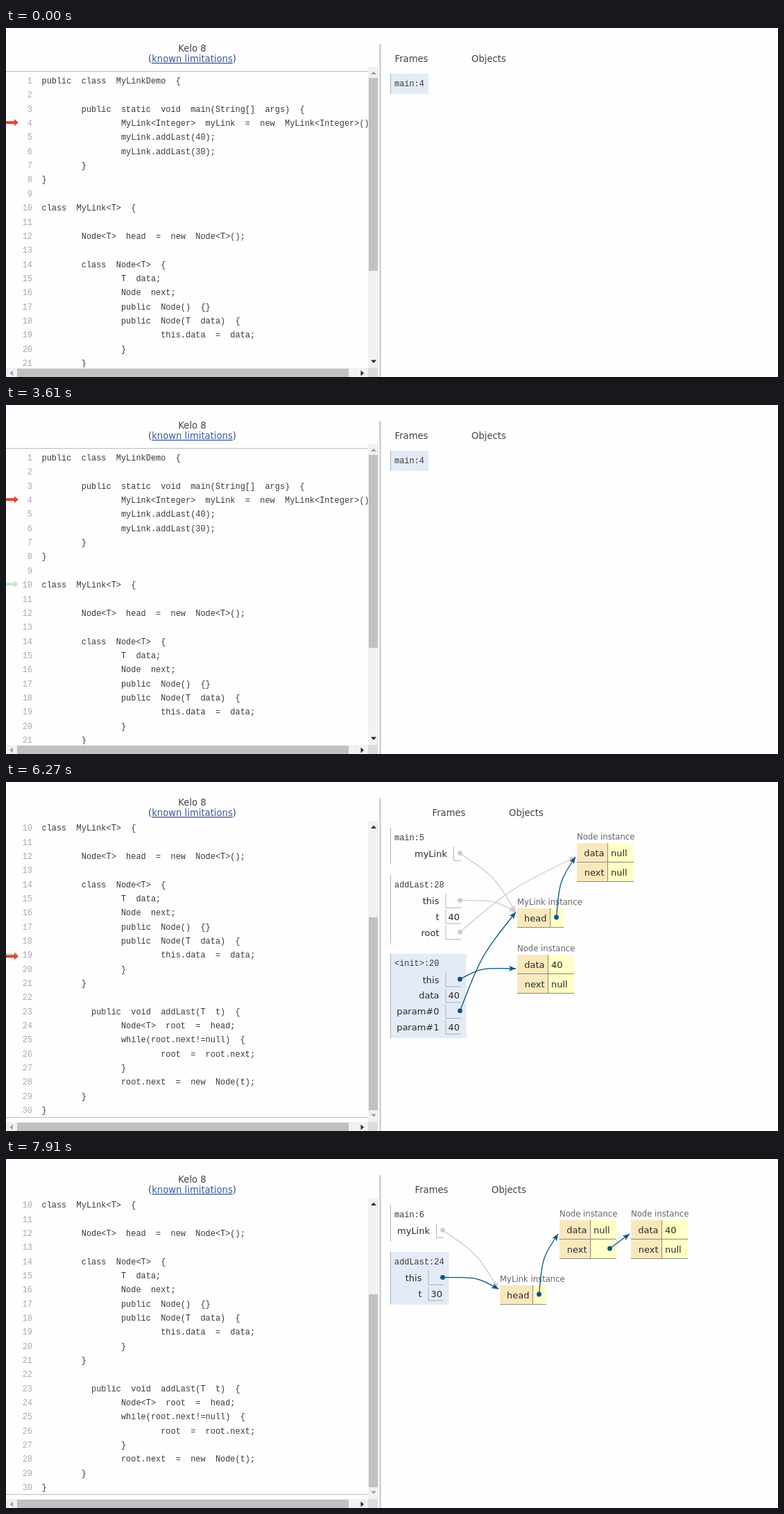
Write an HTML page that moves like this. It is 1113 px wide and 503 px high and loops after 7990 ms.

```html
<!DOCTYPE html>
<html lang="en">
<head>
<meta charset="utf-8">
<title>Linked list, step by step</title>
<style>
  html, body { margin: 0; width: 100%; height: 100%; overflow: hidden; background: #fefefe; }
  svg { display: block; }
  text { font: 13px "DejaVu Sans", sans-serif; fill: #2a2a2a; white-space: pre; }
  .mono { font-family: "Liberation Mono", monospace; fill: #3a3a3a; }
  .num { fill: #aaa; }
  .head { font-size: 13.2px; fill: #444; }
  .link { fill: #3d58a2; text-decoration: underline; }
  .type { font-size: 11.65px; fill: #666; }
  .ret { font-size: 12px; fill: #e93f34; }
</style>
</head>
<body>
<script>
const LOOP = 7990, MAX_SCROLL = 193, LINE = 20.35;
const BLUE = '#005583', GREY = '#ccc';

const SOURCE = `public class MyLinkDemo {

\tpublic static void main(String[] args) {
\t\tMyLink<Integer> myLink = new MyLink<Integer>();
\t\tmyLink.addLast(40);
\t\tmyLink.addLast(30);
\t}
}

class MyLink<T> {

\tNode<T> head = new Node<T>();

\tclass Node<T> {
\t\tT data;
\t\tNode next;
\t\tpublic Node() {}
\t\tpublic Node(T data) {
\t\t\tthis.data = data;
\t\t}
\t}

\t public void addLast(T t) {
\t\tNode<T> root = head;
\t\twhile(root.next!=null) {
\t\t\troot = root.next;
\t\t}
\t\troot.next = new Node(t);
\t}
}`;

// Heap layouts: id, type, x from column, label y, fields ("name=value" or "name>id")
const first = 'N Node 86 79 data=null next=null';
const link = 'M MyLink 0 173 head>N';
const HEAPS = {
  none: [],
  empty: ['M MyLink 0 79 head=null'],
  making: ['M MyLink 0 79 head=null', 'N Node 0 146 data=null next=null'],
  one: [first, link],
  fresh: [first, link, 'K Node 0 240 data=null next=null'],
  filled: [first, link, 'K Node 0 240 data=40 next=null'],
  two: ['N Node 86 79 data=null next>K', link, 'K Node 189 79 data=40 next=null']
};

const main5 = 'main:5 myLink>M', main6 = 'main:6 myLink>M';
const add = ' this>M t=40', root = add + ' root>N';
const make = ' this>K data=40 param#0>M param#1=40';
// Panels: start, right edge of the stack, heap, stack frames
const PANELS = [
  [0, 609, 'none', 'main:4'],
  [1090, 630, 'empty', 'main:4', '<init>:10 this>M'],
  [1780, 630, 'empty', 'main:4', '<init>:12 this>M'],
  [2250, 651, 'making', 'main:4', '<init>:12 this>M', '<init>:17 this>N param#0>M'],
  [2490, 674, 'making', 'main:4', '<init>:12 this>M', '<init>:17 this>N param#0>M Return=void'],
  [2730, 630, 'empty', 'main:4', '<init>:12 this>M'],
  [3130, 653, 'one', 'main:4', '<init>:10 this>M Return=void'],
  [3370, 609, 'none', 'main:4'],
  [3690, 638, 'one', main5],
  [4130, 638, 'one', main5, 'addLast:24' + add],
  [4770, 638, 'one', main5, 'addLast:25' + root],
  [5090, 638, 'one', main5, 'addLast:28' + root],
  [5250, 663, 'fresh', main5, 'addLast:28' + root, '<init>:18' + make],
  [5950, 663, 'fresh', main5, 'addLast:28' + root, '<init>:19' + make],
  [6180, 663, 'filled', main5, 'addLast:28' + root, '<init>:20' + make],
  [6410, 674, 'filled', main5, 'addLast:28' + root, '<init>:20' + make + ' Return=void'],
  [6650, 638, 'one', main5, 'addLast:28' + root],
  [7060, 653, 'two', main5, 'addLast:29' + root + ' Return=void'],
  [7240, 638, 'two', main5],
  [7450, 638, 'two', main6],
  [7670, 638, 'two', main6, 'addLast:24 this>M t=30']
];

// Gutter arrow: click, slide start, duration, line
const SLIDES = [
  [1090, 1365, 250, 10], [1780, 1970, 250, 12], [2340, 2340, 230, 17],
  [2600, 2600, 60, 17], [2840, 2840, 250, 12], [3120, 3120, 220, 10],
  [3390, 3390, 230, 4], [3650, 3650, 230, 5], [4450, 4450, 170, 24],
  [4770, 4970, 240, 25], [5210, 5210, 250, 28], [5530, 5530, 250, 18],
  [5930, 5930, 220, 19], [6200, 6200, 220, 20], [6520, 6520, 60, 20],
  [6780, 6780, 250, 28], [7070, 7070, 150, 29], [7340, 7340, 140, 5],
  [7490, 7490, 100, 6]
];
// Scroll: start, duration, from, to
const SCROLLS = [
  [4128, 300, 0, MAX_SCROLL], [7200, 180, MAX_SCROLL, 0], [7610, 290, 0, MAX_SCROLL]
];

function el(parent, tag, attrs, content) {
  const e = document.createElementNS('http://www.w3.org/2000/svg', tag);
  for (const k in attrs) e.setAttribute(k, attrs[k]);
  if (content !== undefined) e.textContent = content;
  parent.append(e);
  return e;
}
const group = p => el(p, 'g', {});
const rect = (p, x, y, width, height, fill) => el(p, 'rect', { x, y, width, height, fill });
const path = (p, d, stroke, w = 1) => el(p, 'path', { d, stroke, 'stroke-width': w, fill: 'none' });
const poly = (p, points, fill) => el(p, 'polygon', { points, fill });
const text = (p, x, y, s, cls = '', anchor = 'start') =>
  el(p, 'text', { x, y, class: cls, 'text-anchor': anchor }, s);

// Choose the size that gives the code its character pitch
const pen = document.createElement('canvas').getContext('2d');
pen.font = '100px "Liberation Mono", monospace';
const codeSize = 716 / pen.measureText('0').width;
const mono = (p, x, y, s, cls = '', anchor) => {
  text(p, x, y, s, 'mono ' + cls, anchor).style.fontSize = codeSize + 'px';
};

const stage = el(document.body, 'svg', { width: 1113, height: 503, viewBox: '0 0 1113 503' });

// Header
text(stage, 268.5, 34, 'Kelo 8', 'head', 'middle');
const title = text(stage, 268.5, 49, '(', 'head', 'middle');
el(title, 'tspan', { class: 'link' }, 'known limitations');
el(title, 'tspan', {}, ')');

// Code
const view = el(stage, 'svg', { x: 0, y: 56, width: 522, height: 433, viewBox: '0 56 522 433' });
const code = group(view);
path(code, 'M0 62.5H522M0 676.5H522', '#bbb');
SOURCE.split('\n').forEach((s, i) => {
  const y = 80 + i * LINE;
  mono(code, 38, y, i + 1, 'num', 'end');
  mono(code, 51.5, y, s.replace(/ /g, '  ').replace(/\t/g, ' '.repeat(8)));
});
const ARROW = '0,-2 12,-2 12,-5 18,0 12,5 12,2 0,2';
const prevArrow = poly(code, ARROW, '#c9e6ca');
const curArrow = poly(code, ARROW, '#e0452e');

// Scrollbars and divider
rect(stage, 522, 56, 15, 434, '#f1f1f1');
rect(stage, 0, 490, 522, 13, '#f1f1f1');
rect(stage, 522, 490, 14, 13, '#dcdcdc');
const thumb = rect(stage, 523, 72, 13, 278, '#c1c1c1');
rect(stage, 16, 491, 478, 12, '#c1c1c1');
const up = poly(stage, '526,67 534,67 530,62.5');
const down = poly(stage, '526,478.5 534,478.5 530,483');
poly(stage, '10,493.5 10,501.5 5.5,497.5', '#a3a3a3');
poly(stage, '511.5,493.5 511.5,501.5 516,497.5', '#5a1530');
rect(stage, 538, 23, 3, 480, '#d6d6d6');

function connect(p, [x0, y0], [x1, y1], color) {
  const dx = x1 - x0, dy = y1 - y0;
  const bend = Math.hypot(dx, dy) < 60 ? 0 : 9;
  const cx = x0 + dx / 2 + (dy > 0 ? bend : -bend), cy = y0 + dy / 2 - bend;
  path(p, `M${x0} ${y0}C${cx} ${cy} ${cx} ${cy} ${x1} ${y1}`, color, 1.3);
  el(p, 'circle', { cx: x0, cy: y0, r: 3.4, fill: color });
  const turn = Math.atan2(y1 - cy, x1 - cx) * 180 / Math.PI;
  poly(p, '0,0 -10,-4 -7.5,0 -10,4', color)
    .setAttribute('transform', `translate(${x1} ${y1}) rotate(${turn})`);
}

function drawObject(p, x, spec, tips, wires) {
  const [id, type, dx, labelY, ...fields] = spec.split(' ');
  const left = x + +dx, top = +labelY + 9;
  const isNode = type === 'Node';
  const keyW = isNode ? 44.5 : 47.5;
  const valW = isNode || fields[0].includes('=') ? 37.5 : 19.5;
  text(p, left, +labelY + 4, type + ' instance', 'type');
  fields.forEach((f, i) => {
    const y = top + i * 28, mid = left + keyW;
    const [name, value] = f.split(/[=>]/);
    rect(p, left, y, keyW, 27, '#fae8bd');
    rect(p, mid, y, valW, 27, '#ffffc6');
    path(p, `M${left} ${y + 27.5}h${keyW + valW}M${mid} ${y}v27`, '#8a8a80');
    text(p, mid - 5, y + 18.5, name, '', 'end');
    if (f.includes('=')) text(p, mid + 4.5, y + 18.5, value);
    else wires.push([[mid + (isNode ? 28 : 9), y + 13], value, BLUE]);
  });
  tips[id] = [left - 2, top + (isNode ? 20 : 5.5)];
}

function drawFrame(p, top, right, spec, active, wires) {
  const [label, ...vars] = spec.split(' ');
  const cellW = spec.includes('void') ? 33 : spec.includes('=') ? 22 : 10.5;
  const cell = right - 7 - cellW;
  const rets = spec.includes('Return') ? 1 : 0, n = vars.length - rets;
  const h = (vars.length ? 30.2 : 29) + n * 22.8 + rets * 35;
  if (active) rect(p, 554, top, right - 553.5, h, '#e2ebf6');
  path(p, `M554.5 ${top}v${h}`, '#a6b3b6');
  mono(p, 560, top + 17.5, label);
  vars.forEach((v, i) => {
    const [name, value] = v.split(/[=>]/), isRet = name === 'Return';
    const y = top + 37.3 + i * 22.8 + (isRet ? 6 : 0), half = isRet ? 16 : 10;
    path(p, `M${cell} ${y - half}v${2 * half}h${cellW}`, '#a6b3b6');
    if (isRet) {
      text(p, cell - 9.5, y - 3, name, 'ret', 'end');
      text(p, cell - 9.5, y + 11, 'value', 'ret', 'end');
    } else text(p, cell - 9.5, y + 4.7, name, '', 'end');
    if (v.includes('=')) text(p, cell + 3.5, y + 4.7, value);
    else wires.push([[right - 8.5, y - 0.7], value, active ? BLUE : GREY]);
  });
  return top + h + 15;
}

const panels = PANELS.map(([start, right, heap, ...frames]) => {
  const g = group(stage), tips = {}, wires = [];
  text(g, right - 48.5, 48.5, 'Frames', 'head');
  text(g, right + 62, 48.5, 'Objects', 'head');
  HEAPS[heap].forEach(o => drawObject(g, right + 74, o, tips, wires));
  let top = 66;
  frames.forEach((f, i) => { top = drawFrame(g, top, right, f, i === frames.length - 1, wires); });
  wires.sort((a, b) => (a[2] === BLUE) - (b[2] === BLUE));
  wires.forEach(([from, id, color]) => connect(g, from, tips[id], color));
  return { start, g };
});

const clamp = v => Math.max(0, Math.min(1, v));
const cubic = p => p < 0.5 ? 4 * p ** 3 : 1 - 4 * (1 - p) ** 3;
const swing = p => 0.5 - Math.cos(Math.PI * p) / 2;
const lineY = n => 75.2 + (n - 1) * LINE;

function scrollAt(t) {
  let y = 0;
  for (const [start, dur, from, to] of SCROLLS)
    if (t >= start) y = from + (to - from) * swing(clamp((t - start) / dur));
  return y;
}

function arrowsAt(t) {
  let line = 4, y = lineY(4), prev = null;
  for (const [click, start, dur, to] of SLIDES) {
    if (t < click) break;
    const same = to === line, goal = lineY(to) + (same ? 2.8 : 0);
    prev = lineY(line) - (same ? 1.5 : 0);
    y += (goal - y) * cubic(clamp((t - start) / dur));
    line = to;
  }
  return { y, prev };
}

function draw(t) {
  const scroll = scrollAt(t), { y, prev } = arrowsAt(t);
  code.setAttribute('transform', `translate(0 ${-scroll})`);
  thumb.setAttribute('y', Math.round(72 + scroll * 0.637));
  up.setAttribute('fill', scroll > 0 ? '#2b2f6b' : '#a3a3a3');
  down.setAttribute('fill', scroll < MAX_SCROLL ? '#5a1530' : '#a3a3a3');
  curArrow.setAttribute('transform', `translate(0 ${y})`);
  prevArrow.setAttribute('transform', `translate(0 ${prev || 0})`);
  prevArrow.style.display = prev === null ? 'none' : '';
  panels.forEach(({ start, g }, i) => {
    const end = i + 1 < panels.length ? panels[i + 1].start : LOOP;
    g.style.display = t >= start && t < end ? '' : 'none';
  });
}

const began = performance.now();
function tick() {
  draw((performance.now() - began) % LOOP);
  requestAnimationFrame(tick);
}
draw(0);
requestAnimationFrame(tick);
</script>
</body>
</html>
```
